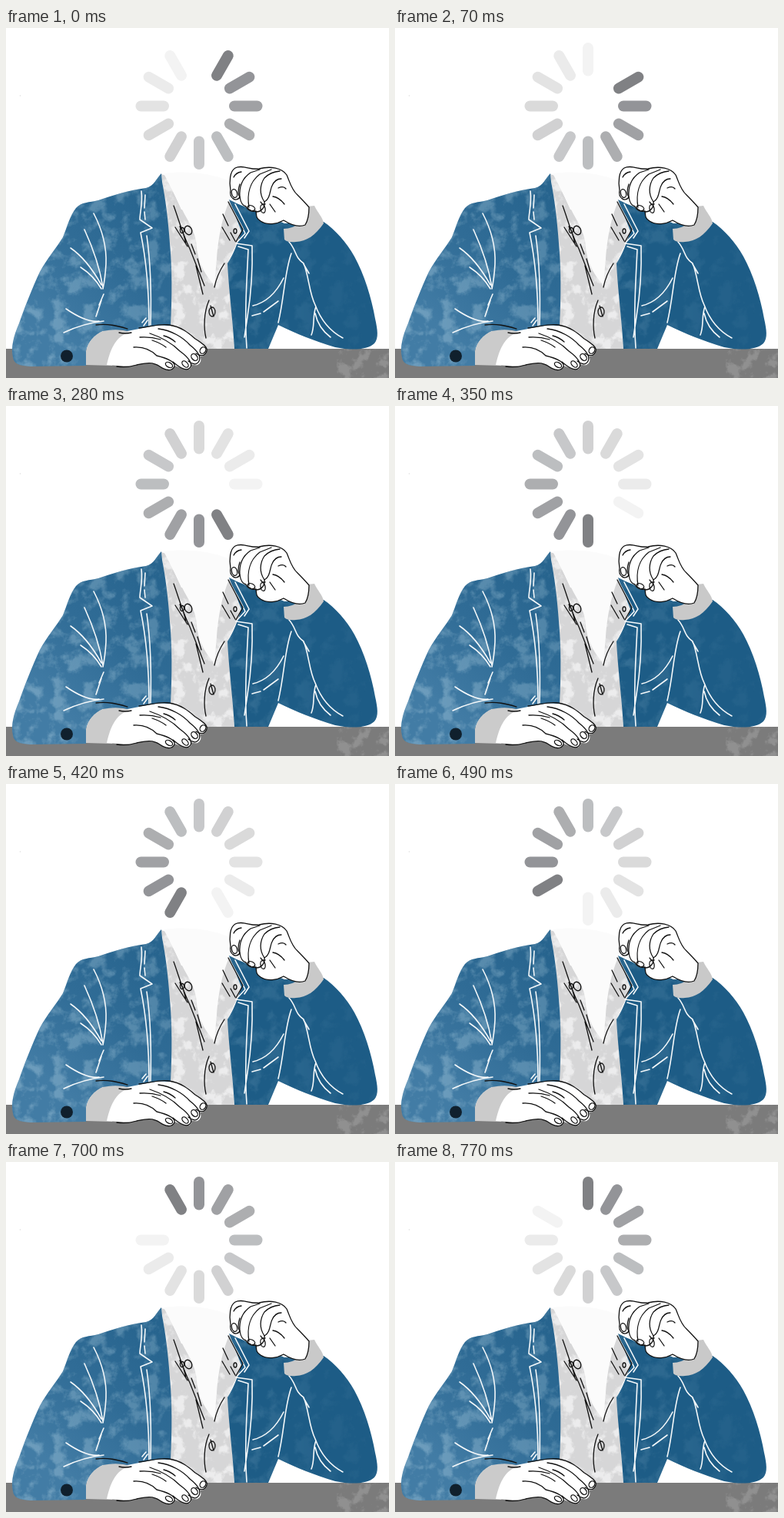
An HTML page that plays this animation: 498x455 px, repeating every 0.84 s.

```html
<!DOCTYPE html>
<html lang="en">
<head>
<meta charset="utf-8">
<title>Loading head</title>
<style>
html, body { margin: 0; width: 100%; height: 100%; overflow: hidden; background: #fff; }
svg { position: absolute; left: 0; top: 0; width: 498px; height: 455px; }
.line { fill: none; stroke-linecap: round; stroke-linejoin: round; }
.white { stroke: #f4f8fa; stroke-width: 1.6; }
.ink { stroke: #111; stroke-width: 1.3; }
#spinner { will-change: transform; }
#spinner line { stroke-width: 14; stroke-linecap: round; }
</style>
</head>
<body>
<svg viewBox="0 0 498 455">
  <defs>
    <linearGradient id="cloth" gradientUnits="userSpaceOnUse" x1="70" y1="400" x2="215" y2="235">
      <stop offset="0" stop-color="#427ca5"/>
      <stop offset=".5" stop-color="#306c96"/>
      <stop offset="1" stop-color="#27648e"/>
    </linearGradient>
    <linearGradient id="fade" gradientUnits="userSpaceOnUse" x1="40" y1="0" x2="420" y2="0">
      <stop offset="0" stop-color="#fff"/>
      <stop offset=".45" stop-color="#bbb"/>
      <stop offset=".75" stop-color="#555"/>
      <stop offset="1" stop-color="#222"/>
    </linearGradient>
    <mask id="wear"><rect width="498" height="455" fill="url(#fade)"/></mask>
    <filter id="grain" x="0" y="0" width="1" height="1" color-interpolation-filters="sRGB">
      <feTurbulence type="fractalNoise" baseFrequency=".05" numOctaves="5" seed="4"/>
      <feColorMatrix values="0 0 0 0 .72  0 0 0 0 .84  0 0 0 0 .9  4.5 0 0 0 -2.1"/>
    </filter>
    <filter id="chalk" x="0" y="0" width="1" height="1" color-interpolation-filters="sRGB">
      <feTurbulence type="fractalNoise" baseFrequency=".06" numOctaves="5" seed="9"/>
      <feColorMatrix values="0 0 0 0 1  0 0 0 0 1  0 0 0 0 1  6 0 0 0 -3"/>
    </filter>
    <path id="left" d="M202 189C196 195 192 206 182 208C160 211 140 217 120 224C108 227 98 226 91 234C83 244 79 260 74 272C66 285 52 302 44 317C34 338 24 364 17 384C10 400 6 415 9 428C10 437 18 439 32 440L104 439L104 420C107 408 114 400 126 394L158 394L188 388L214 387C216 350 216 310 213 280C211 250 207 220 203 200Z"/>
    <path id="right" d="M290 223L300 228L362 254L413 252C428 262 443 279 453 297C466 321 475 350 480 378C483 392 485 403 479 410C470 419 448 419 428 415C402 407 376 397 354 386L341 417L297 417C295 380 290 345 288 306C297 292 300 282 306 264Z"/>
    <path id="shirt" d="M202 190L208 192L228 236L272 240L291 224L308 262L289 304L297 417L214 417L214 300L207 225Z"/>
    <clipPath id="inJacket"><use href="#left"/><use href="#right"/></clipPath>
    <clipPath id="inShirt"><use href="#shirt"/></clipPath>
  </defs>

  <circle cx="18.5" cy="88" r=".8" fill="#ddd"/>
  <rect y="417" width="498" height="38" fill="#7b7b7b"/>
  <rect x="430" y="417" width="68" height="38" filter="url(#chalk)" opacity=".16"/>

  <use href="#shirt" fill="#d6d6d7"/>
  <g clip-path="url(#inShirt)"><rect x="200" y="185" width="110" height="235" filter="url(#chalk)" opacity=".55"/></g>
  <path fill="#fbfbfb" d="M205 189C225 186 265 186 292 200L291 224C283 240 276 270 274 300L271 334C262 325 250 308 248 285C247 265 237 252 229 236Z"/>

  <use href="#left" fill="url(#cloth)"/>
  <use href="#right" fill="#1d5c86"/>
  <g clip-path="url(#inJacket)"><g mask="url(#wear)"><rect width="498" height="455" filter="url(#grain)" opacity=".36"/></g></g>

  <g class="line white">
    <path d="M114 241C125 262 131 285 130 307Q129 325 126 339M102 262C113 286 122 312 126 337M84 286C100 297 114 316 124 334M97 311Q114 322 124 339"/>
    <path d="M127 346L121 360M124 354L117 375M78 365C94 376 108 383 121 381M75 396C92 388 108 383 127 381"/>
    <path d="M176 212C178 228 174 240 174 249L190 260L175 266C182 300 186 345 186 387M183 270C188 305 189 350 188 386"/>
    <path d="M181 217L180 234M180 239L181 249M177 383l5-6M179 387l5-7"/>
    <path d="M289 226C297 240 304 252 311 267L299 280L320 283C321 320 318 350 314 375L310 402M302 284L315 288C313 330 310 372 313 416"/>
    <path d="M298 229L316 264L310 273M361 325C351 345 338 357 321 361M320 374L331 371M335 369L354 355M371 293C362 318 362 350 354 383"/>
    <path d="M368 278C378 289 375 298 387 306C394 323 394 344 402 360C409 379 421 394 438 403M403 362C398 376 402 387 397 399M402 371Q406 390 422 402M387 307L394 319"/>
  </g>

  <g class="line ink">
    <path d="M218 231C225 250 229 267 239 287L258 335M220 259L236 284M226 258Q231 265 234 281M241 281L246 294M247 309L256 346M249 300L254 317"/>
    <ellipse cx="237" cy="263" rx="4.5" ry="6" transform="rotate(-25 237 263)"/>
    <ellipse cx="229" cy="263" rx="2.5" ry="3.5"/>
    <ellipse cx="268" cy="369" rx="4" ry="6"/>
    <path d="M264 354C257 370 257 390 260 403M266 361L270 375M284 306C276 318 273 327 271 337M289 226L308 262L299 278M282 242L289 257M281 259L291 276M292 266L298 277"/>
    <ellipse cx="298" cy="264" rx="2" ry="3"/>
  </g>

  <circle cx="79" cy="426.500" r="8" fill="#10202d"/>

  <path fill="#cbcbcb" d="M104 438L104 420C107 408 114 399 126 394Q145 390 162 395L138 439Z"/>
  <path fill="#fff" d="M131 438C136 417 142 403 158 396L195 387C220 384 239 397 254 410C262 415 263 421 259 425Q254 428 252 426Q256 434 249 438Q245 439 241 437Q242 445 234 444L219 439C218 446 207 446 200 440C188 433 174 437 160 440Z"/>
  <g class="line ink">
    <path d="M117 386C132 384 144 387 158 391M147 396Q155 398 163 396M173 390C190 388 200 384 212 386C228 388 239 398 246 404C254 409 263 415 261 420C259 427 253 427 247 423"/>
    <path d="M198 391C215 393 230 402 239 412C248 419 254 427 251 433C248 439 242 437 237 433M187 397C202 402 216 410 226 420C237 428 244 437 239 442C234 447 225 441 217 434"/>
    <path d="M166 415C179 414 188 418 196 426C208 429 221 434 219 440C216 447 207 445 200 440C190 433 180 436 170 438Q157 442 144 440M174 402Q188 401 201 405M190 406Q200 409 208 415M205 400Q213 402 220 408"/>
    <ellipse cx="256" cy="419" rx="3.500" ry="4.500" transform="rotate(35 256 419)"/>
    <ellipse cx="245" cy="428" rx="3.500" ry="5" transform="rotate(-40 245 428)"/>
    <ellipse cx="233" cy="437" rx="3" ry="5" transform="rotate(-45 233 437)"/>
    <ellipse cx="212" cy="438" rx="3" ry="5" transform="rotate(-60 212 438)"/>
  </g>

  <path fill="#c9c9c9" d="M361 261C377 261 389 250 392 232L401 231C405 240 412 246 413 254C403 269 390 278 377 278Q366 279 362 275Z"/>
  <path class="ink" fill="#fff" stroke-linejoin="round" d="M292 211C290 200 291 186 298 182C307 177 318 185 329 183C344 179 359 182 365 191C369 200 371 210 379 217Q388 226 394 233Q394 248 389 256C379 260 369 255 361 250C352 255 340 257 331 251C324 247 326 242 325 238Q316 240 312 232Q306 231 304 220C299 227 290 221 292 211Z"/>
  <g class="line ink">
    <path d="M304 220C303 207 306 196 318 188L330 184M316 233C313 216 317 200 330 190L345 184M325 239C333 239 337 232 336 226C329 216 330 204 336 195Q344 187 356 186"/>
    <path d="M304 220Q300 215 304 203M336 226C344 222 343 210 346 205Q350 196 358 196M347 219Q355 220 362 229M354 208Q361 205 364 209M343 229L350 239M296 194Q299 188 306 187"/>
    <ellipse cx="297" cy="215" rx="3.500" ry="5.500" transform="rotate(-15 297 215)"/>
    <ellipse cx="319" cy="234" rx="5" ry="3" transform="rotate(25 319 234)"/>
    <ellipse cx="334" cy="235" rx="3" ry="5.500" transform="rotate(-10 334 235)"/>
    <path d="M331 226Q333 230 337 229"/>
  </g>
</svg>

<svg id="spinner" viewBox="0 0 498 455"></svg>

<script>
const STEP = 70;
const shades = ["#808184", "#939498", "#a0a1a4", "#adaeb0", "#bcbec0", "#c7c8ca",
  "#d1d1d2", "#dadada", "#e3e3e3", "#ebebeb", "#f3f3f3", "transparent"];
const count = shades.length;
const spinner = document.getElementById("spinner");

// Shade of a bar after a number of steps; the darkest bar moves clockwise.
const shadeAt = (bar, step) => shades[(bar - step - 1 + 2 * count) % count];

for (let bar = 0; bar < count; bar++) {
  const line = document.createElementNS("http://www.w3.org/2000/svg", "line");
  const place = { x1: 251, x2: 251, y1: 26, y2: 55.5, stroke: shadeAt(bar, 0),
    transform: `rotate(${bar * 360 / count} 251 101.5)` };
  for (const key in place) line.setAttribute(key, place[key]);
  spinner.append(line);

  const frames = Array.from({ length: count + 1 }, (_, step) => ({
    stroke: shadeAt(bar, step % count), offset: step / count, easing: "step-end"
  }));
  line.animate(frames, { duration: STEP * count, iterations: Infinity });
}
</script>
</body>
</html>
```
